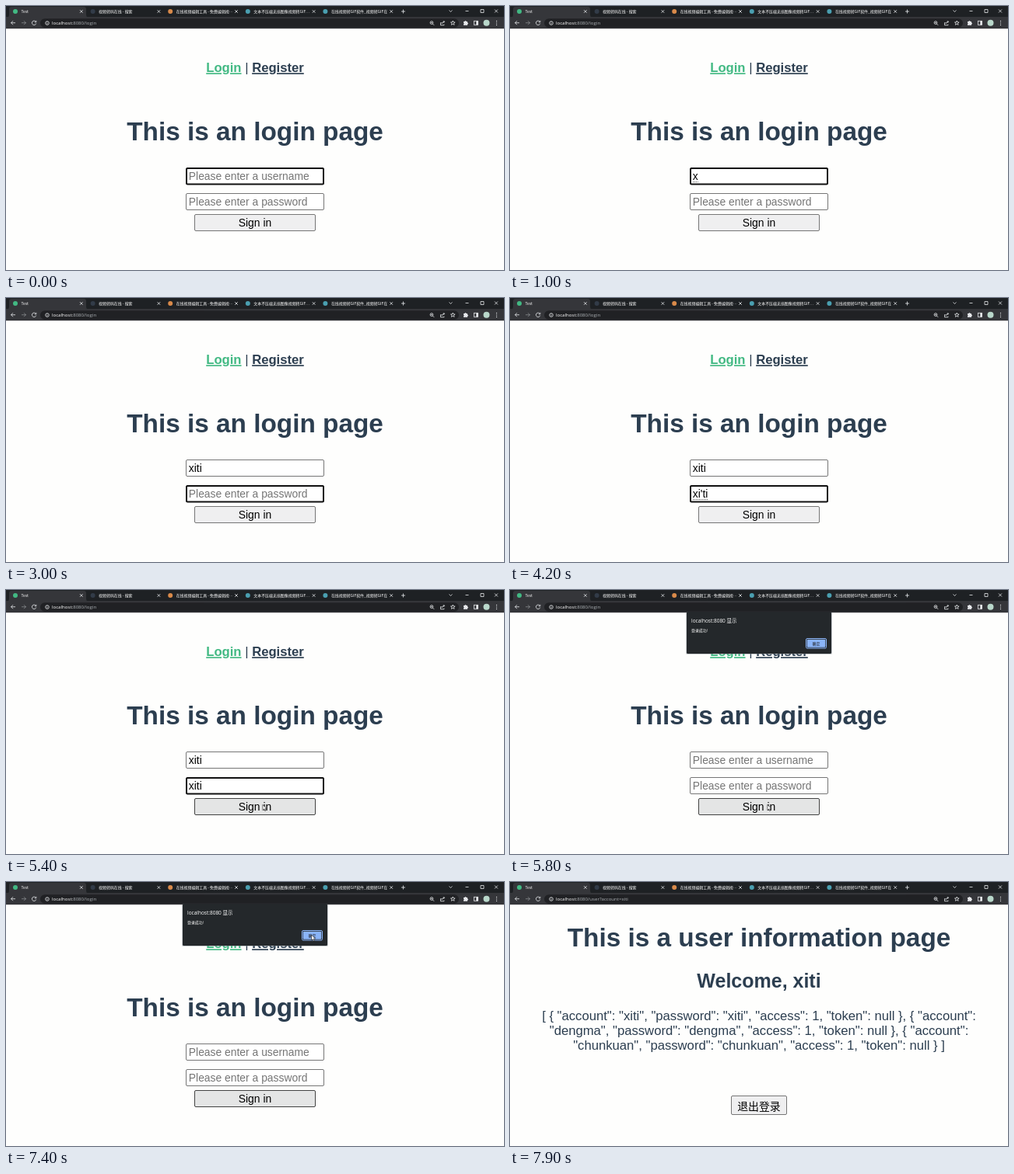
Write an HTML page that moves like this. It is 640 px wide and 340 px high and loops after 8000 ms.

```html
<!DOCTYPE html>
<html lang="en">
<head>
<meta charset="utf-8">
<title>Login demo</title>
<style>
html, body { margin: 0; width: 100%; height: 100%; overflow: hidden; background: #fefefd; }
svg { display: block; width: 640px; height: 340px; font-family: "Liberation Sans", Arial, sans-serif; fill: #2c3e50; }
text { white-space: pre; }
.mid { text-anchor: middle; }
.bold { font-weight: bold; }
.h1 { font-size: 33.33px; }
.h2 { font-size: 25px; }
.body { font-size: 16.67px; }
.form { font-size: 13.89px; fill: #000; }
.ui { font: 6.1px "Open Sans", "Noto Sans CJK SC", "Noto Sans CJK", sans-serif; fill: #fff; }
.tab { font: 500 4.95px "Noto Sans CJK SC", "Noto Sans CJK", sans-serif; fill: #fff; }
.dim { fill: #adb1b5; }
.icon { fill: none; stroke: #e8eaed; stroke-width: .8; }
.box { fill: #fff; stroke: #767676; stroke-width: 1; }
.button { fill: #efeff0; stroke: #767676; stroke-width: 1; }
.button.hover { fill: #e4e5e5; stroke: #424242; }
.focus { fill: none; stroke: #101010; stroke-width: 2; }
.compose { stroke: #222; stroke-width: .8; stroke-dasharray: 1 1; }
</style>
</head>
<body>
<svg viewBox="0 0 640 340">
  <rect width="640" height="340" fill="#fefefd"/>

  <g id="login">
    <text class="body bold mid" x="320" y="85.2"><tspan fill="#42b983" text-decoration="underline">Login</tspan><tspan font-weight="normal"> | </tspan><tspan text-decoration="underline">Register</tspan></text>
    <text class="h1 bold mid" x="320" y="173">This is an login page</text>
    <g id="user" transform="translate(231 208)"></g>
    <g id="pass" transform="translate(231 241)"></g>
    <rect id="sign" class="button" x="242.5" y="268.5" width="155" height="21" rx="1.5"/>
    <text class="form mid" x="320" y="284">Sign in</text>
  </g>

  <g id="info">
    <text class="h1 bold mid" x="320" y="83">This is a user information page</text>
    <text class="h2 bold mid" x="320" y="136">Welcome, xiti</text>
    <g class="body mid">
      <text x="320" y="178">[ { "account": "xiti", "password": "xiti", "access": 1, "token": null }, { "account":</text>
      <text x="320" y="197.2">"dengma", "password": "dengma", "access": 1, "token": null }, { "account":</text>
      <text x="320" y="216.4">"chunkuan", "password": "chunkuan", "access": 1, "token": null } ]</text>
    </g>
    <rect class="button" x="284.5" y="275.5" width="71" height="24" rx="1.5"/>
    <text class="form mid" x="320" y="293.5" style="font-family:'Noto Sans CJK SC','Noto Sans CJK',sans-serif">退出登录</text>
  </g>

  <g id="chrome">
    <rect width="640" height="15" fill="#1e2124"/>
    <path d="M1 14.5Q4 14.5 4 11V4Q4 1 7 1H100Q103 1 103 4V11Q103 14.5 106 14.5Z" fill="#35363a"/>
    <rect y="14" width="640" height="15.15" fill="#35363a"/>
    <rect x="44" y="16.3" width="538" height="11.4" rx="5.7" fill="#202124"/>
    <g id="tabs"></g>
    <path class="icon" d="M508 7h5m-2.5-2.5v5M569.5 5.5l2 2 2-2M590.5 6.5h4M610 4.5h4v4h-4zM628 4.5l4 4m0-4l-4 4"/>
    <path class="icon" d="M12 21.7H6.5m2.5-2.5l-2.5 2.5 2.5 2.5M38.3 20.2a2.7 2.7 0 1 0 .4 2.3M38.8 18.8v2h-2"/>
    <path class="icon" d="M20 21.7h5.5m-2.5-2.5l2.5 2.5-2.5 2.5" stroke-opacity=".45"/>
    <g class="icon" stroke-width=".6">
      <circle cx="53" cy="22" r="2.3"/><path d="M53 21.7v1.6M53 20.4v.5"/>
      <circle cx="547" cy="21.5" r="1.9"/><path d="M548.4 23l1.8 1.8M546 21.5h2"/>
      <path d="M559.5 21.5h-1v3.2h4.5v-1.2M560 23q.3-2.7 3.5-2.7m-1.3-1.4l1.4 1.4-1.4 1.4"/>
      <path d="M574.3 19l.8 1.9 2 .1-1.6 1.3.6 2-1.8-1.1-1.8 1.1.6-2-1.6-1.3 2-.1z"/>
      <rect x="601.5" y="19.3" width="5" height="5"/>
    </g>
    <path d="M588 20h1.5a1 1 0 0 1 2 0h1.5v1.6a1 1 0 0 1 0 2v1.2h-5v-1.5a1 1 0 0 0 0-1.8zM604.3 19.3h2.4v5h-2.4z" fill="#e8eaed"/>
    <circle cx="617.5" cy="21.8" r="4" fill="#b9d8cb"/>
    <path d="M630.5 19.3v.1m0 2.4v.1m0 2.4v.1" stroke="#e8eaed" stroke-width="1.2" stroke-linecap="round"/>
    <text class="ui" x="59" y="24.2">localhost:<tspan id="path" class="dim"></tspan></text>
  </g>

  <g id="alert">
    <rect x="226" y="28.5" width="188" height="54.5" rx="2" fill="#8b929a" opacity=".45"/>
    <rect x="227" y="28" width="186" height="54" rx="1.5" fill="#24282b"/>
    <text class="ui" x="233" y="41.8" style="font-size:6.5px">localhost:8080 显示</text>
    <text class="tab" x="233" y="53.6">登录成功!</text>
    <rect x="380.5" y="62.5" width="26" height="12.5" rx="1.5" fill="none" stroke="#8ab4f8"/>
    <rect x="381.7" y="63.7" width="23.6" height="10.1" rx="1" fill="#8ab4f8"/>
    <text class="tab mid" x="393.5" y="70.6" style="fill:#202124">确定</text>
  </g>

  <path id="mouse" d="M0 0V7.2L1.7 5.6 2.8 8 4 7.5 2.9 5.2H5.1Z" fill="#fff" stroke="#111" stroke-width=".6"/>
</svg>
<script>
const $ = id => document.getElementById(id);

const tabs = [
  ['#42b983', 'Test'],
  ['#323b48', '视频转码在线 - 搜索'],
  ['#d98a4a', '在线视频编辑工具 - 免费编辑视…'],
  ['#4a9fb0', '文本不压缩无损图像视频转GIF…'],
  ['#4a9fb0', '在线视频转GIF软件_视频转GIF在']
];
$('tabs').innerHTML = tabs.map(([color, title], i) => {
  const x = i * 99.6;
  return `<circle cx="${x + 12}" cy="7" r="3" fill="${color}"/>
    <text class="tab" x="${x + 19.5}" y="9">${title}</text>
    <path class="icon" d="M${x + 95} 5.2l3.6 3.6m0-3.6l-3.6 3.6"/>`;
}).join('');

// A text field: placeholder, value, composition underline and focus ring
function field(id, hint) {
  const g = $(id);
  g.innerHTML = `<rect class="box" x=".5" y=".5" width="177" height="21" rx="1.5"/>
    <text class="form" x="3.8" y="16.4"></text>
    <path class="compose"/>
    <rect class="focus" x="1" y="1" width="176" height="20.5" rx="1.5"/>`;
  const [text, line, ring] = ['text', '.compose', '.focus'].map(s => g.querySelector(s));
  return (value, focused) => {
    text.textContent = value || hint;
    text.style.fill = value ? '#000' : '#757575';
    ring.style.display = focused ? '' : 'none';
    const composing = value && value !== 'xiti';
    line.setAttribute('d', composing ? `M4 18.6H${3.8 + text.getComputedTextLength()}` : '');
  };
}
const setUser = field('user', 'Please enter a username');
const setPass = field('pass', 'Please enter a password');

const steps = ['', 'x', 'xi', "xi't", "xi'ti", 'xiti'];
const typed = (t, times) => steps[times.filter(at => t >= at).length];
const show = (id, on) => $(id).style.display = on ? '' : 'none';

const TAB = 2800, HOVER = 4900, ALERT = 5800, LEAVE = 7600;
const route = [[4500, 352, 256], [5000, 329.5, 276.5], [6300, 331.5, 276.5], [7200, 392.5, 68]];

function mouseAt(t) {
  let i = 0;
  while (i < route.length - 2 && t > route[i + 1][0]) i++;
  const [t0, x0, y0] = route[i], [t1, x1, y1] = route[i + 1];
  const k = Math.max(0, Math.min(1, (t - t0) / (t1 - t0)));
  const e = k * k * (3 - 2 * k);
  return [x0 + (x1 - x0) * e, y0 + (y1 - y0) * e];
}

function draw() {
  const t = Math.floor(performance.now() % 8000 / 100) * 100;
  const done = t >= LEAVE, sent = t >= ALERT;
  show('login', !done);
  show('info', done);
  show('alert', sent && !done);
  show('mouse', t >= 4500 && !done);
  $('path').textContent = done ? '8080/user?account=xiti' : '8080/login';
  if (!done) {
    setUser(sent ? '' : typed(t, [900, 1200, 1400, 1600, 2200]), t < TAB);
    setPass(sent ? '' : typed(t, [3400, 3600, 3900, 4100, 4500]), t >= TAB && !sent);
    $('sign').classList.toggle('hover', t >= HOVER);
    $('mouse').setAttribute('transform', `translate(${mouseAt(t)})`);
  }
  requestAnimationFrame(draw);
}
draw();
</script>
</body>
</html>
```
